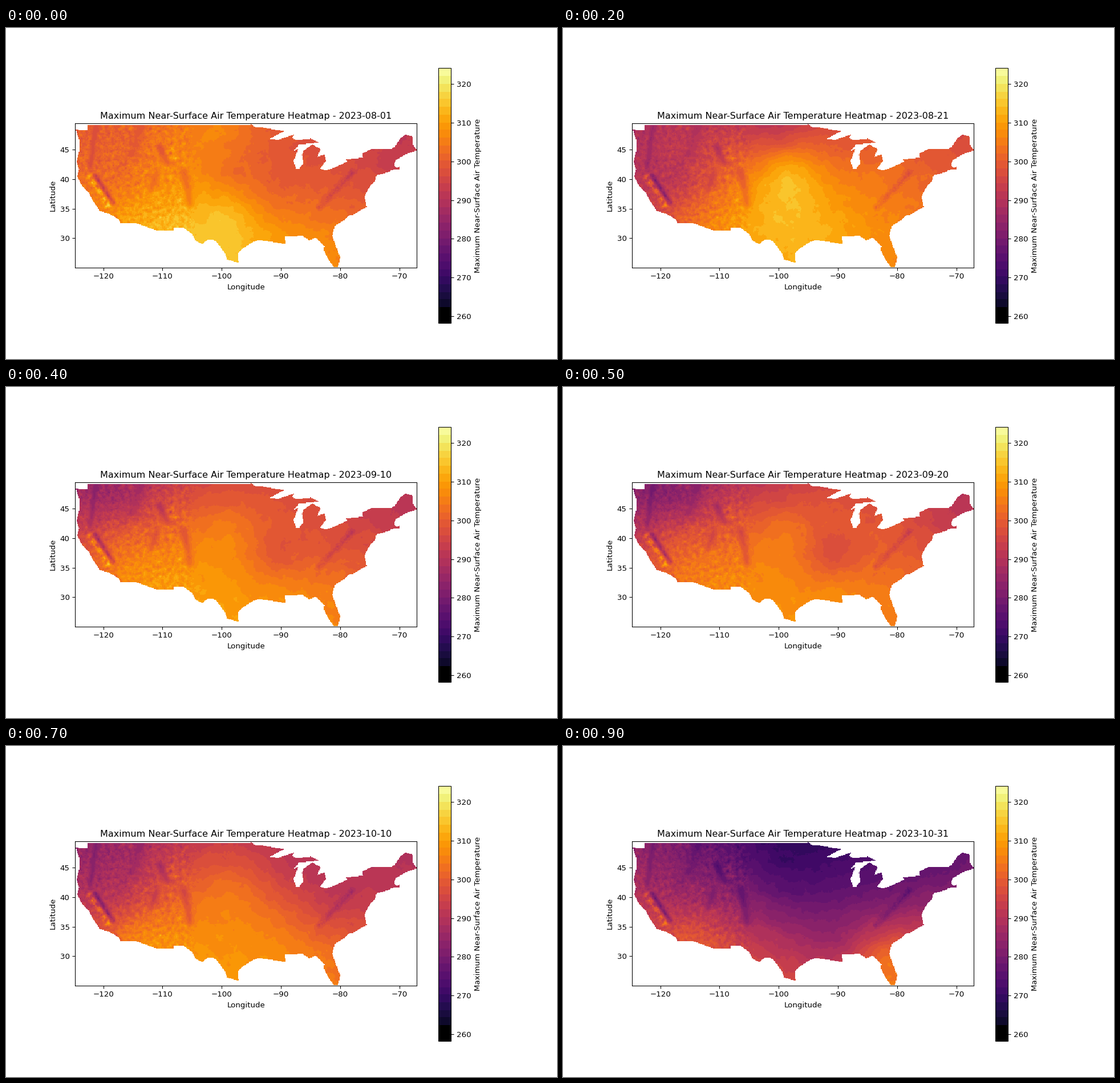
Animation, 966 px wide and 580 px high, one loop 1 s. Source, as a matplotlib script:

```python
import numpy as np
import matplotlib.pyplot as plt
from matplotlib.animation import FuncAnimation
from matplotlib.colors import ListedColormap
from matplotlib.path import Path

WIDTH, HEIGHT, DPI = 966, 580, 96
LAYOUT_WIDTH, LAYOUT_HEIGHT = 967, 581
FRAMES, INTERVAL = 10, 100
EXTENT = (-124.793, -67.037, 25.046, 49.42)
VMIN, VMAX = 258.28, 324.11
COLS, ROWS = 462, 195
LABEL = "Maximum Near-Surface Air Temperature"

plt.rcParams["font.family"] = "DejaVu Sans"

# Key points of the outline, anticlockwise from the north-west, as (lon, lat).
PACIFIC = [
    (-122.7, 49.03), (-122.65, 48.2), (-123.9, 48.16), (-124.7, 48.38),
    (-124, 46.3), (-124.05, 44.7), (-124.55, 42.84), (-124.1, 41.6),
    (-124.4, 40.4), (-123.7, 38.95), (-122.5, 37.75), (-122, 36.7),
    (-120.65, 34.6), (-119.2, 34.15), (-118.4, 33.8), (-117.35, 33.1),
    (-117.12, 32.55),
]
SOUTH = [
    (-114.75, 32.6), (-111.07, 31.33), (-108.2, 31.33), (-108.2, 31.78),
    (-106.5, 31.78), (-105, 30.68), (-104.4, 29.55), (-103.3, 29),
    (-102.4, 29.78), (-101.4, 29.77), (-100.7, 29.1), (-99.5, 27.5),
    (-99.1, 26.4), (-97.2, 25.9), (-97.35, 27.4), (-96.4, 28.35),
    (-94.75, 29.35), (-93.8, 29.7), (-91.3, 29.35), (-89.3, 29),
    (-89.4, 30.25), (-86.4, 30.4), (-85.3, 29.68), (-84.1, 30.07),
    (-82.7, 28.7), (-82.8, 27.9), (-81.75, 25.95), (-81.1, 25.15),
]
ATLANTIC = [
    (-80.4, 25.15), (-80.05, 26.8), (-81.4, 30.4), (-81, 32),
    (-79.3, 33.1), (-78.5, 33.87), (-77.95, 33.9), (-76.6, 34.7),
    (-75.55, 35.25), (-75.95, 37), (-75.1, 38.6), (-74.05, 39.8),
    (-73.95, 40.57), (-71.9, 41.1), (-71.4, 41.45), (-70, 41.6),
    (-70.1, 42.05), (-70.5, 41.8), (-71, 42.3), (-70.6, 43.2),
    (-69, 44.1), (-67, 44.8), (-67.8, 45.7), (-67.8, 47.07),
    (-69.05, 47.43), (-70, 46.7), (-70.85, 45.3), (-71.5, 45.02),
]
LAKES = [
    (-74.7, 45.02), (-76.3, 44.2), (-76.2, 43.55), (-79.05, 43.27),
    (-78.9, 42.85), (-81.25, 41.77), (-82.5, 41.4), (-83.4, 41.7),
    (-82.45, 43), (-82.7, 44.05), (-83.9, 43.7), (-83.35, 45),
    (-84.75, 45.77), (-86.2, 44.7), (-86.5, 44), (-86.25, 42.6),
    (-87, 41.7), (-87.5, 41.65), (-87.9, 43), (-87.1, 45.15),
    (-88, 44.55), (-87, 45.75), (-83.6, 46.05), (-85, 46.75),
    (-87.4, 46.5), (-88.2, 46.9), (-87.75, 47.45), (-90.4, 46.55),
    (-92, 46.7), (-89.5, 48), (-90.8, 48.2), (-93, 48.6),
    (-94.6, 48.75), (-95.15, 49.4), (-95.15, 49.03),
]

# Regional anchors: lon, lat and kelvin at the KEY_STEPS of the loop.
KEY_STEPS = [0, 2, 3, 5, 6, 8, 9]
REGIONS = {
    "northwest": (-118, 46, [301, 292, 292, 285, 280, 294, 283]),
    "great basin": (-117, 40, [303, 292, 303, 298, 286, 298, 287]),
    "desert": (-114, 33.5, [311, 303, 311, 305, 303, 309, 298]),
    "north plains": (-100, 48, [306, 293, 301, 294, 294, 296, 270]),
    "central plains": (-98.5, 41, [303, 313, 307, 304, 305, 303, 276]),
    "south plains": (-99, 34, [314, 314, 310, 306, 308, 306, 287]),
    "midwest": (-90, 43.5, [299, 302, 299, 299, 301, 288, 274]),
    "ozarks": (-91, 37, [302, 309, 301, 297, 306, 299, 281]),
    "delta": (-90, 31.5, [308, 311, 307, 306, 307, 306, 288]),
    "ohio": (-82, 40, [299, 304, 296, 300, 299, 286, 280]),
    "southeast": (-82, 30, [306, 307, 306, 305, 305, 302, 302]),
    "northeast": (-71, 44.5, [293, 298, 292, 292, 292, 289, 278]),
}

# Relief: kelvin added, half width in degrees, ends of the ridge or basin.
RELIEF = [
    (-9, 0.45, (-121.4, 40.5), (-118.4, 36)),
    (6, 0.5, (-122.2, 40.2), (-119.1, 35.5)),
    (-4, 0.5, (-121.3, 48.9), (-122.2, 42)),
    (-3, 0.9, (-113.8, 48.8), (-115, 44.3)),
    (-5, 0.6, (-110.4, 45.2), (-109.3, 42.8)),
    (3, 0.6, (-108.6, 44.8), (-108.1, 43.6)),
    (-5, 0.7, (-106.4, 41), (-105.4, 35.8)),
    (-4, 0.5, (-111, 41), (-112, 38)),
    (-4, 0.6, (-83.5, 35.3), (-78, 41)),
]


def segment_distance(lon, lat, a, b):
    (ax, ay), (bx, by) = a, b
    dx, dy = bx - ax, by - ay
    u = np.clip(((lon - ax) * dx + (lat - ay) * dy) / (dx * dx + dy * dy), 0, 1)
    return np.hypot(lon - ax - u * dx, lat - ay - u * dy)


def spectral_noise(seed, slope, lowest):
    """Unit-variance noise whose spectrum falls off as k ** -slope."""
    rng = np.random.default_rng(seed)
    ky = np.fft.fftfreq(ROWS)[:, None] * ROWS
    kx = np.fft.fftfreq(COLS)[None, :] * ROWS
    k = np.hypot(kx, ky)
    gain = np.where(k > lowest, np.maximum(k, 1) ** -slope, 0)
    field = np.fft.ifft2(np.fft.fft2(rng.normal(size=(ROWS, COLS))) * gain).real
    return field / field.std()


def build_mask(lon, lat):
    outline = Path(PACIFIC + SOUTH + ATLANTIC + LAKES)
    cells = np.column_stack([lon.ravel(), lat.ravel()])
    return outline.contains_points(cells).reshape(lon.shape)


def build_relief(lon, lat):
    west = 1 / (1 + np.exp((lon + 104.8) * 2.5))
    rough = spectral_noise(4, 1.6, 14)
    total = 1.3 * west * rough + 0.4 * spectral_noise(9, 1.8, 5)
    for change, width, start, end in RELIEF:
        gap = segment_distance(lon, lat, start, end)
        total += change * np.exp(-(gap / width) ** 2) * (1 + 0.3 * rough)
    return total


def kernel(dx, dy):
    return np.sqrt(dx ** 2 + dy ** 2 + 3)


def build_weather(lon, lat):
    """One smooth temperature field per step, through all anchors."""
    x, y = np.array([region[:2] for region in REGIONS.values()]).T
    kelvin = np.array([np.interp(range(FRAMES), KEY_STEPS, levels)
                       for _, _, levels in REGIONS.values()])
    mean = kelvin.mean(axis=0)
    weights = np.linalg.solve(kernel(x[:, None] - x, y[:, None] - y),
                              kelvin - mean)
    basis = kernel(lon[..., None] - x, lat[..., None] - y)
    return np.moveaxis(basis @ weights + mean, -1, 0)


def banded_inferno(bands=31, black=0.06):
    """Inferno in flat bands above a solid black foot."""
    edges = np.linspace(black, 1, bands + 1)
    middles = (edges[1:] + edges[:-1]) / 2
    colors = np.vstack([(0, 0, 0, 1), plt.get_cmap("inferno")(middles)])
    return ListedColormap(colors[np.searchsorted(edges[:-1],
                                                 np.linspace(0, 1, 256))])


def title_for(step):
    day = np.datetime64("2023-08-01") + step * 91 // (FRAMES - 1)
    return f"{LABEL} Heatmap - {day}"


west, east, south, north = EXTENT
lon, lat = np.meshgrid(
    west + (np.arange(COLS) + 0.5) * (east - west) / COLS,
    north - (np.arange(ROWS) + 0.5) * (north - south) / ROWS)
sea = ~build_mask(lon, lat)
maps = np.ma.array(build_weather(lon, lat) + build_relief(lon, lat),
                   mask=np.broadcast_to(sea, (FRAMES, ROWS, COLS)))

fig, ax = plt.subplots(figsize=(WIDTH / DPI, HEIGHT / DPI), dpi=DPI)
fig.subplots_adjust(left=0.125 * LAYOUT_WIDTH / WIDTH,
                    right=0.9 * LAYOUT_WIDTH / WIDTH,
                    top=1 - 0.12 * LAYOUT_HEIGHT / HEIGHT,
                    bottom=1 - 0.89 * LAYOUT_HEIGHT / HEIGHT)
image = ax.imshow(maps[0], extent=EXTENT, cmap=banded_inferno(), vmin=VMIN,
                  vmax=VMAX, interpolation="nearest")
fig.colorbar(image, ax=ax, label=LABEL, ticks=range(260, 321, 10))
ax.set(xlabel="Longitude", ylabel="Latitude",
       xticks=range(-120, -69, 10), yticks=range(30, 46, 5))
title = ax.set_title(title_for(0))


def update(step):
    image.set_data(maps[step])
    title.set_text(title_for(step))
    return image, title


animation = FuncAnimation(fig, update, frames=FRAMES, interval=INTERVAL,
                          repeat=True, repeat_delay=0, blit=False)
plt.show()
```
